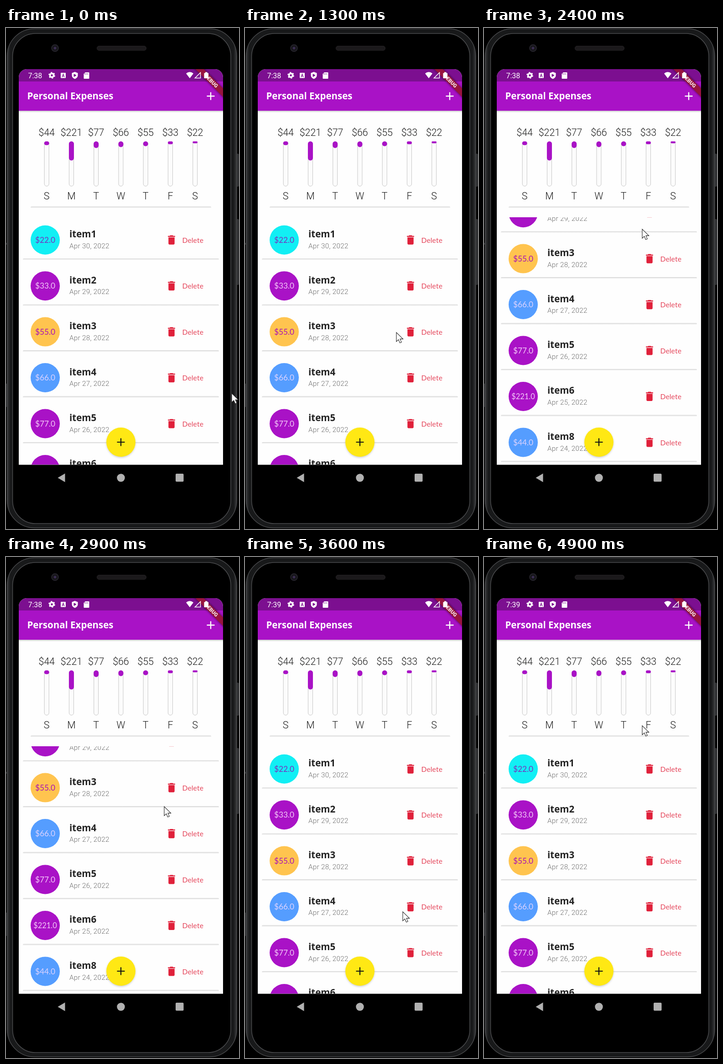
These frames come from a looping animation (511 by 1096 pixels, 5000 ms). An HTML page:

```html
<!DOCTYPE html>
<html lang="en">
<head>
<meta charset="utf-8">
<title>Expenses app</title>
<style>
  html, body { margin: 0; width: 100%; height: 100%; overflow: hidden; background: #000; }
  svg { display: block; width: 511px; height: 1096px; }
  text { font-family: Roboto, sans-serif; }
  .bold { font: 700 20.5px "Open Sans", sans-serif; }
  .round { font-family: Lato, sans-serif; }
  .mid { text-anchor: middle; }
  .label { font-size: 21.4px; font-weight: 300; fill: #1c1c1c; }
  .date { font-size: 15.3px; font-weight: 300; letter-spacing: .27px; fill: #6c6c6c; }
  .delete { font-size: 15.6px; letter-spacing: .15px; fill: #e5475c; }
</style>
</head>
<body>
<svg viewBox="0 0 511 1096">
  <defs>
    <linearGradient id="rim">
      <stop offset="0" stop-color="#3a3b3d"/>
      <stop offset=".014" stop-color="#18191a"/>
      <stop offset=".986" stop-color="#18191a"/>
      <stop offset="1" stop-color="#3a3b3d"/>
    </linearGradient>
    <linearGradient id="edge" x2="0" y2="1">
      <stop offset="0" stop-color="#d6d6d6"/>
      <stop offset=".4" stop-color="#e2e2e2"/>
      <stop offset="1" stop-color="#fff"/>
    </linearGradient>
    <linearGradient id="shade" x2="0" y2="1">
      <stop offset="0" stop-color="#000" stop-opacity=".2"/>
      <stop offset="1" stop-color="#000" stop-opacity="0"/>
    </linearGradient>
    <filter id="blur" x="-30%" y="-30%" width="160%" height="160%"><feGaussianBlur stdDeviation="2.4"/></filter>
    <clipPath id="screen"><path d="M28 955.500V108a18 18 0 0 1 18-18H458a18 18 0 0 1 18 18V955.500z"/></clipPath>
    <clipPath id="view"><rect x="28" y="414" width="448" height="541.500"/></clipPath>
  </defs>

  <rect width="511" height="1096"/>
  <g fill="#2e2f31">
    <rect x="505" y="275" width="6" height="72" rx="2"/>
    <rect x="505" y="418" width="6" height="144" rx="2"/>
    <rect y="470" width="3" height="4"/>
    <rect y="778" width="3" height="51"/>
  </g>
  <rect x="2.500" y="1.500" width="503.500" height="1092" rx="60" fill="url(#rim)" stroke="#48494b" stroke-width="1.500"/>
  <rect x="14.500" y="12" width="478.500" height="1072" rx="50" stroke="#4a4b4d" stroke-width="1.500"/>
  <rect x="199.500" y="39.500" width="108" height="9.500" rx="4.500" fill="#1b191b" stroke="#262426"/>
  <circle cx="107.500" cy="44" r="7.500" fill="#17161b" stroke="#2a2831" stroke-width="1.500"/>
  <circle cx="107.500" cy="44" r="2.800" fill="#3a2d52"/>

  <g clip-path="url(#screen)">
    <rect x="28" y="90" width="448" height="866" fill="#fefefe"/>
    <g id="chart"></g>
    <rect x="54" y="390.500" width="396" height="3.500" rx="1.700" fill="url(#edge)"/>

    <g clip-path="url(#view)"><g id="list"></g></g>

    <circle cx="252" cy="908" r="31" opacity=".25" filter="url(#blur)"/>
    <circle cx="252" cy="906" r="32" fill="#ffe814"/>
    <path d="M243.500 906h17M252 897.500v17" stroke="#111" stroke-width="2.200"/>

    <rect x="28" y="181" width="448" height="4" fill="url(#shade)"/>
    <rect x="28" y="117" width="448" height="64" fill="#a912c6"/>
    <rect x="28" y="90" width="448" height="27" fill="#7c0f90"/>
    <text class="bold" x="46.500" y="156" fill="#fff">Personal Expenses</text>
    <path d="M440.500 149h17M449 140.500v17" stroke="#fff" stroke-width="2.400"/>

    <g transform="translate(450.500 116) rotate(45)">
      <rect x="-60" y="-6.500" width="120" height="13" opacity=".6" filter="url(#blur)"/>
      <rect x="-60" y="-6.500" width="120" height="13" fill="#98143f"/>
      <text class="mid" y="4" fill="#f6e6ea" font-size="11.200" font-weight="900">DEBUG</text>
    </g>

    <g fill="#fff">
      <text id="clock" x="48.500" y="109.800" font-size="16">7:38</text>
      <g fill="none" stroke="#fff">
        <circle cx="100.500" cy="103.500" r="4" stroke-width="3.400"/>
        <circle cx="100.500" cy="103.500" r="6.200" stroke-width="2.200" stroke-dasharray="3.250"/>
      </g>
      <rect x="120" y="98" width="11" height="11.500" rx="1"/>
      <path d="M151 96l6.500 2.500v5q0 5.500-6.500 8-6.500-2.500-6.500-8v-5z"/>
      <path d="M174 97h7.500q1 0 1 1v12q0 1-1 1h-10q-1 0-1-1v-9.500z"/>
      <path d="M395 99.500q8-6.500 16 0l-8 10.500z"/>
      <path d="M426.500 97.500v12h-12z" fill="none" stroke="#fff" stroke-width="1.500"/>
      <path d="M434.500 98.500h2.500v-2h4.500v2h2.500v11.500h-9.500z"/>
    </g>
    <path d="M123 107.500l2.500-7 2.500 7M124 105.300h3" fill="none" stroke="#7c0f90" stroke-width="1.200"/>
    <path d="M149 100.800v5.600l5-2.800zM173 99v3M176 99v3M179 99v3" fill="#7c0f90" stroke="#7c0f90"/>
  </g>

  <g fill="#b1b1b1">
    <path d="M113.500 984l16-9.500v19z"/>
    <circle cx="252" cy="984" r="8.700"/>
    <rect x="372" y="975" width="17.500" height="17.500" rx="2"/>
  </g>
  <path id="pointer" d="M0 0V20l4.600-4.300 3.100 7.200 3.500-1.500-3.100-7h6.500z" fill="#fff" stroke="#222" stroke-width="1.100"/>
</svg>

<script>
const $ = id => document.getElementById(id);
const clamp = (v, lo, hi) => Math.min(hi, Math.max(lo, v));
const PURPLE = '#a912c6', LILAC = '#f3c8f8';

const spending = [44, 221, 77, 66, 55, 33, 22];
const total = spending.reduce((a, b) => a + b);
$('chart').innerHTML = spending.map((sum, i) => {
  const x = 89.2 + 54.25 * i, h = 98 * sum / total;
  return `<text class="label mid" x="${x}" y="235.500">$${sum}</text>
    <rect x="${x - 5}" y="248.500" width="10" height="97.500" rx="5" fill="#fcfcfc" stroke="#c6c6c6"/>
    <rect x="${x - 5.5}" y="248" width="11" height="${h}" rx="${Math.min(5.5, h / 2)}" fill="${PURPLE}"/>
    <text class="label mid" x="${x}" y="375">${'SMTWTFS'[i]}</text>`;
}).join('');

const items = [
  [1, 22, '#12eff4', '#7a2fc0'],
  [2, 33, PURPLE, LILAC],
  [3, 55, '#ffc44f', '#a912b4'],
  [4, 66, '#559dff', '#dcd2ff'],
  [5, 77, PURPLE, LILAC],
  [6, 221, PURPLE, LILAC],
  [8, 44, '#559dff', '#dcd2ff']
];
$('list').innerHTML = items.map(([id, sum, back, ink], i) =>
  `<g transform="translate(0 ${463.7 + 100.45 * i})">
    <rect x="37" y="40.500" width="430" height="3.500" rx="1.700" fill="url(#edge)"/>
    <circle cx="86" r="32" fill="${back}"/>
    <text class="round mid" x="86" y="6.200" font-size="${sum > 99 ? 16.4 : 17.3}" fill="${ink}">$${sum}.0</text>
    <text class="bold" x="139" y="-5.500" fill="#222">item${id}</text>
    <text class="date" x="139" y="18.300">Apr ${30 - i}, 2022</text>
    <path transform="translate(363 0) scale(1.120) translate(-12 -12)" fill="#e0203a"
      d="M6 19c0 1.100.9 2 2 2h8c1.100 0 2-.9 2-2V7H6zM19 4h-3.500l-1-1h-5l-1 1H5v2h14z"/>
    <text class="round delete" x="386.500" y="6.200">Delete</text>
  </g>`).join('');

// Pointer path: time, x, y
const path = [
  [0, 495, 799], [700, 495, 799], [1300, 332, 666], [1900, 342, 545],
  [2400, 347, 440], [2600, 347, 440], [2900, 347, 546], [3100, 347, 591],
  [3600, 346, 776], [3700, 346, 776], [4900, 347, 369], [5000, 347, 369]
];
const END = 160;

function pointerAt(t) {
  const i = path.findIndex(p => p[0] > t);
  const [t0, x0, y0] = path[i - 1], [t1, x1, y1] = path[i];
  const k = (t - t0) / (t1 - t0);
  return [x0 + (x1 - x0) * k, y0 + (y1 - y0) * k];
}

// Two drags: up from y 657, then down from y 546
function scrollAt(t, y) {
  if (t < 1400 || t > 3600) return 0;
  return clamp(t <= 2400 ? 657 - y : END + 546 - y, 0, END);
}

const start = performance.now();
function tick() {
  const t = Math.floor((performance.now() - start) % 5000 / 100) * 100;
  const [x, y] = pointerAt(t);
  $('pointer').setAttribute('transform', `translate(${x} ${y})`);
  $('list').setAttribute('transform', `translate(0 ${-scrollAt(t, y)})`);
  $('clock').textContent = t < 3300 ? '7:38' : '7:39';
  requestAnimationFrame(tick);
}
tick();
</script>
</body>
</html>
```
